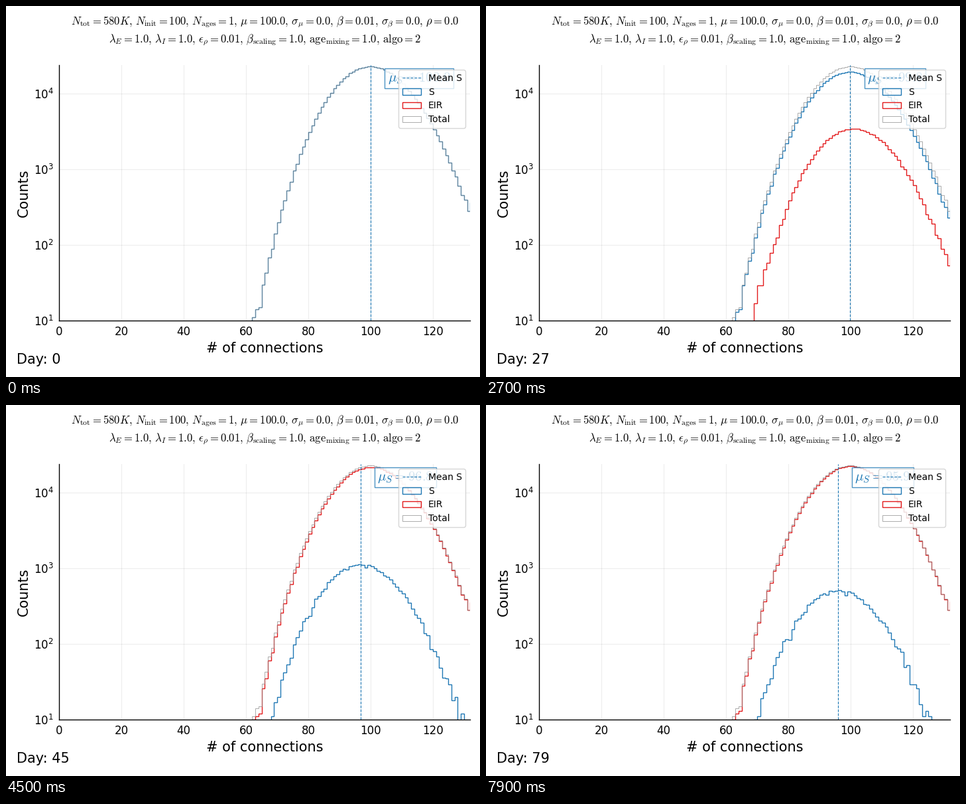
A matplotlib script for the animation above (8000 ms loop, 715 by 559 pixels).

```python
import math

import matplotlib.pyplot as plt
import numpy as np
from matplotlib.animation import FuncAnimation
from matplotlib.lines import Line2D
from matplotlib.patches import Patch

W, H, DPI = 715, 559, 100
DAYS, STEP_MS = 80, 100
BLUE, RED, GRAY = "#1F78B4", "#E31A1C", "#8c8c8c"
N_TOTAL, MU = 580_000, 100
DECADE = 114  # pixels per power of ten

rng = np.random.default_rng(4)
k = np.arange(60, 133)
edges = np.arange(60, 134)


def degree_counts():
    """Slightly widened Poisson distribution of contact numbers."""
    log_p = np.array([i * math.log(MU) - MU - math.lgamma(i + 1) for i in k])
    t = 0.985 * N_TOTAL * np.exp(log_p + 0.013 * ((k - MU) / 10) ** 2)
    t[-1] *= 1 + MU / (k[-1] + 1)  # the last bin is two degrees wide
    return np.round(t + 0.6 * np.sqrt(t) * rng.normal(size=k.size))


def hazard(day):
    """Accumulated infection pressure, a logistic epidemic curve."""
    logit = np.interp(day, [0, 17, 27, 37, 45, 53, 79],
                      [-10.04, -5.53, -3.134, -0.724, 1.316, 3.5, 7])
    return 3.915 / (1 + math.exp(-logit))


total = degree_counts()
z_early, z_late = 0.7 * rng.normal(size=(2, k.size))


def split(day):
    """Susceptible and infected counts; the noise drifts with the epidemic."""
    p = np.exp(-hazard(day) * k / MU)
    noise = z_late * np.sqrt(1 - p) - z_early * np.sqrt(p)
    s = total * p + np.sqrt(total * p * (1 - p)) * noise
    s = np.clip(np.round(s), 0, total)
    return s, total - s


fig = plt.figure(figsize=(W / DPI, H / DPI), dpi=DPI, facecolor="white")
left, right, top, bottom = 80.3, 700.2, 89.1, 474.1
ax = fig.add_axes([left / W, 1 - bottom / H, (right - left) / W, (bottom - top) / H])
ax.set_yscale("log")
ax.set_xlim(0, 132)
ax.set_ylim(10, 10 ** (1 + (bottom - top) / DECADE))
ax.set_xticks(range(0, 121, 20))
ax.minorticks_off()
ax.tick_params(length=0, pad=6, labelsize=12)
ax.grid(color="black", alpha=0.07, lw=0.8)
ax.spines[["top", "right"]].set_visible(False)
ax.spines[["left", "bottom"]].set_linewidth(1.0)
ax.set_xlabel("# of connections", fontsize=15)
ax.set_ylabel("Counts", fontsize=15)


def label(x, y, s, size, **kw):
    return fig.text(x / W, 1 - y / H, s, fontsize=size, va="baseline", **kw)


def equations(*pairs):
    return "$" + r", \, ".join(f"{a} = {b}" for a, b in pairs) + "$"


line1 = equations(
    (r"N_{\mathrm{tot}}", "580K"), (r"N_{\mathrm{init}}", "100"),
    (r"N_{\mathrm{ages}}", "1"), (r"\mu", "100.0"), (r"\sigma_{\mu}", "0.0"),
    (r"\beta", "0.01"), (r"\sigma_{\beta}", "0.0"), (r"\rho", "0.0"))
line2 = equations(
    (r"\lambda_{E}", "1.0"), (r"\lambda_{I}", "1.0"), (r"\epsilon_{\rho}", "0.01"),
    (r"\beta_{\mathrm{scaling}}", "1.0"),
    (r"\mathrm{age}_{\mathrm{mixing}}", "1.0"), (r"\mathrm{algo}", "2"))
for y, line in ((29, line1), (55, line2)):
    label((left + right) / 2, y, line, 12, ha="center", math_fontfamily="cm")
day_text = label(16, 539, "", 15)


def steps(color, lw):
    return ax.stairs(total, edges, baseline=0.1, color=color, lw=lw)


s_hist = steps(BLUE, 1)
eir_hist = steps(RED, 1)
steps(GRAY, 0.5)
mean_line = ax.axvline(MU, color=BLUE, ls="--", lw=0.8)
mean_text = ax.text(
    MU, 10 ** (1 + (bottom - 114.2) / DECADE), "", fontsize=15, color=BLUE,
    va="baseline", math_fontfamily="cm",
    bbox=dict(facecolor="white", edgecolor=BLUE, alpha=0.8, pad=3))


def box(color, lw):
    return Patch(fill=False, edgecolor=color, lw=lw)


ax.legend([Line2D([], [], color=BLUE, ls="--", lw=0.8),
           box(BLUE, 1), box(RED, 1), box(GRAY, 0.5)],
          ["Mean S", "S", "EIR", "Total"], loc="upper right", fontsize=10)


def update(day):
    s, eir = split(day)
    s_hist.set_data(np.maximum(s, 0.1))
    eir_hist.set_data(np.maximum(eir, 0.1))
    mean = MU - 1.045 * hazard(day)
    mean_line.set_xdata([mean, mean])
    mean_text.set_x(mean + 5.45)
    mean_text.set_text(rf"$\mu_S = {mean:.1f}$")
    day_text.set_text(f"Day: {day}")


anim = FuncAnimation(fig, update, frames=DAYS, interval=STEP_MS,
                     init_func=lambda: update(0), repeat=True, repeat_delay=0)
plt.show()
```
